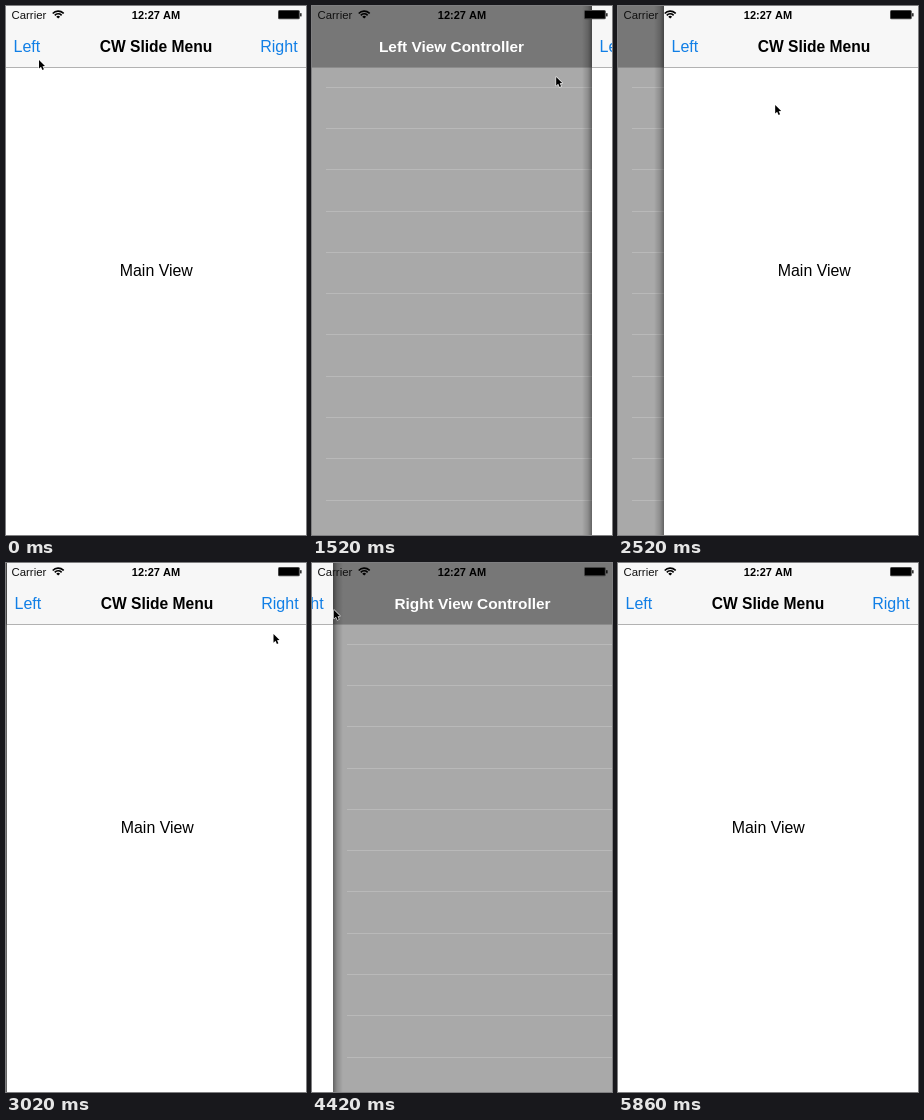
Animation, 300 px wide and 529 px high, one loop 6120 ms. Source, as an HTML page with a canvas:

```html
<!DOCTYPE html>
<html lang="en">
<head>
<meta charset="utf-8">
<title>Slide menu</title>
<style>
  html, body { margin: 0; width: 100%; height: 100%; overflow: hidden; background: #fff; }
  canvas { display: block; width: 300px; height: 529px; }
</style>
</head>
<body>
<canvas id="stage" width="300" height="529"></canvas>
<script>
const W = 301, H = 529, BAR = 61, LOOP = 6120, OPEN = 280;
const FONT = '"Liberation Sans", Arial, sans-serif';
const BLUE = '#117fe6';
const ctx = document.getElementById('stage').getContext('2d');

// Pointer path: time, x, y
const PATH = [
  [0, 33, 54], [20, 33, 54], [140, 22, 43], [400, 22, 43],
  [1020, 164, 60], [1520, 244, 71], [1720, 288, 85],
  [2240, 118, 98], [2300, 118, 98], [2520, 157, 99],
  [3300, 297, 58], [3500, 268, 57], [3600, 217, 55],
  [4120, 64, 50], [4360, 17, 47], [4420, 22, 47],
  [4660, 8, 44], [4780, 8, 44], [4900, -14, 44]
];

// Monotone slope at path point i for axis k
function slope(i, k) {
  const a = PATH[i - 1], b = PATH[i], c = PATH[i + 1];
  if (!a || !c) return 0;
  const p = (b[k] - a[k]) / (b[0] - a[0]);
  const q = (c[k] - b[k]) / (c[0] - b[0]);
  return p * q > 0 ? 2 * p * q / (p + q) : 0;
}

function pointer(t) {
  const i = PATH.findIndex((p, n) => n && t < p[0]) - 1;
  if (i < 0) return null;
  const a = PATH[i], b = PATH[i + 1], d = b[0] - a[0], u = (t - a[0]) / d;
  const axis = k => {
    const h = u * u * (3 - 2 * u);
    return a[k] + (b[k] - a[k]) * h
      + d * u * (1 - u) * ((1 - u) * slope(i, k) - u * slope(i + 1, k));
  };
  return { x: axis(1), y: axis(2) };
}

// Remaining share of a critically damped spring after ms
function rest(ms) {
  const s = Math.max(0, ms) * 0.0089;
  return (1 + s) * Math.exp(-s);
}

function mainX(t, p) {
  if (t < 400) return 0;
  if (t < 1720) return OPEN * (1 - rest(t - 400));
  if (t < 2300) return Math.min(OPEN, p.x - 8);
  if (t < 3300) return 110 * rest(t - 2300);
  if (t < 4360) return Math.max(-OPEN, p.x - 297);
  return t < 5860 ? -OPEN * rest(t - 4780) : 0;
}

function box(x, y, w, h, color) {
  ctx.fillStyle = color;
  ctx.fillRect(x, y, w, h);
}

function text(s, x, y, size, color, align = 'center', weight = 'normal') {
  ctx.font = `${weight} ${size}px ${FONT}`;
  ctx.textAlign = align;
  ctx.fillStyle = color;
  ctx.fillText(s, x, y);
}

function drawMenu(left, title) {
  box(0, 0, W, H, '#a9a9a9');
  box(0, 0, W, BAR, '#777');
  box(0, BAR, W, 1, '#8c8c8c');
  for (let i = 0; i < 11; i++)
    box(left + 14, Math.floor(81.32 + i * 41.27), OPEN, 1, '#b9b9b9');
  text(title, left + 139.5, 46, 15.4, '#fff', 'center', 'bold');
}

function drawShadow(edge, dir) {
  const g = ctx.createLinearGradient(edge, 0, edge + dir * 10, 0);
  g.addColorStop(0, 'rgba(0,0,0,.42)');
  g.addColorStop(0.4, 'rgba(0,0,0,.17)');
  g.addColorStop(1, 'rgba(0,0,0,0)');
  box(dir < 0 ? edge - 10 : edge, 0, 10, H, g);
}

function drawMain(x, leftAlpha) {
  ctx.save();
  ctx.translate(x, 0);
  box(0, 0, W, H, '#fff');
  box(0, 0, W, BAR, '#f7f7f7');
  box(0, BAR, W, 1, '#b2b2b2');
  ctx.globalAlpha = leftAlpha;
  text('Left', 7.5, 46, 16, BLUE, 'left');
  ctx.globalAlpha = 1;
  text('Right', 291.6, 46, 16, BLUE, 'right');
  text('CW Slide Menu', 150, 46, 15.6, '#000', 'center', 'bold');
  text('Main View', 150.3, 270, 15.9, '#000');
  ctx.restore();
}

function drawStatus() {
  text('Carrier', 5.5, 13, 11.4, '#111', 'left');
  text('12:27 AM', 150, 13, 11, '#000', 'center', 'bold');

  // Wi-Fi fan
  ctx.strokeStyle = ctx.fillStyle = '#000';
  ctx.lineWidth = 1.6;
  for (const r of [4.7, 7.5]) {
    ctx.beginPath();
    ctx.arc(52.2, 12.6, r, -Math.PI * 0.76, -Math.PI * 0.24);
    ctx.stroke();
  }
  ctx.beginPath();
  ctx.moveTo(52.2, 12.6);
  ctx.arc(52.2, 12.6, 2.7, -Math.PI * 0.76, -Math.PI * 0.24);
  ctx.fill();

  // Battery
  ctx.fillStyle = '#444';
  ctx.beginPath();
  ctx.roundRect(272, 4, 21.8, 9.2, 1.5);
  ctx.fill();
  box(273, 5, 19.8, 7.2, '#000');
  box(294.2, 7.2, 1.3, 3.2, '#000');
}

function drawPointer({ x, y }) {
  ctx.save();
  ctx.translate(x, y);
  ctx.beginPath();
  for (const [a, b] of [[0, 0], [0, 8.6], [2, 6.8], [3.4, 10], [4.9, 9.3], [3.5, 6.2], [6, 6]])
    ctx.lineTo(a, b);
  ctx.closePath();
  ctx.lineJoin = 'round';
  ctx.lineWidth = 1.2;
  ctx.strokeStyle = 'rgba(255,255,255,.85)';
  ctx.stroke();
  ctx.fillStyle = '#000';
  ctx.fill();
  ctx.restore();
}

function draw(t) {
  const p = pointer(t), x = Math.round(mainX(t, p));
  if (x > 0) {
    drawMenu(0, 'Left View Controller');
    drawShadow(x, -1);
  } else if (x < 0) {
    drawMenu(21, 'Right View Controller');
    drawShadow(x + W, 1);
  }
  const pressed = t >= 120 && t < 400;
  drawMain(x, pressed ? 0.35 : t < 400 ? 1 : Math.min(1, 0.35 + (t - 400) / 350));
  drawStatus();
  if (p) drawPointer(p);
}

const start = performance.now();
function tick() {
  draw((performance.now() - start) % LOOP);
  requestAnimationFrame(tick);
}
tick();
</script>
</body>
</html>
```
